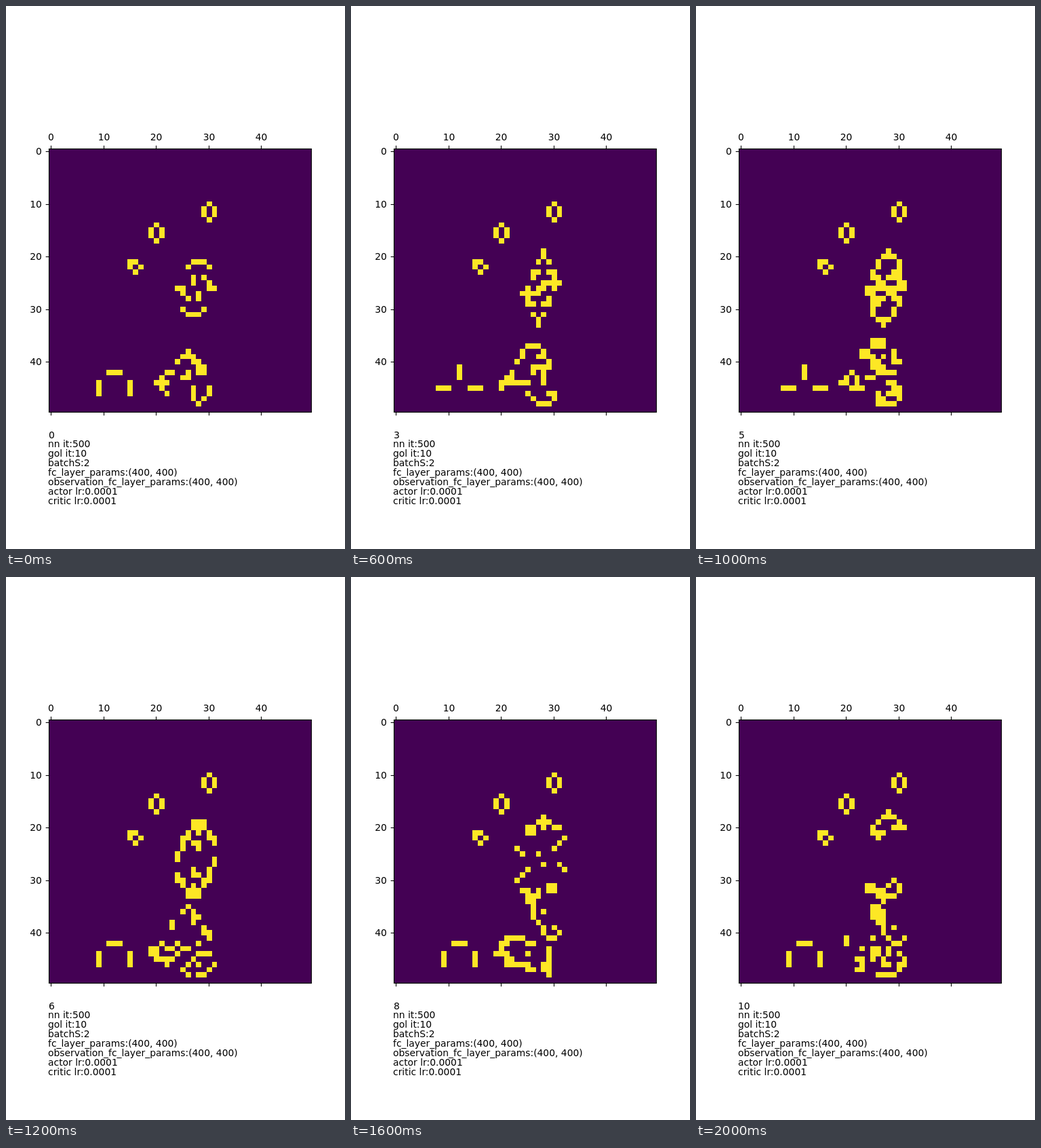
An HTML page with a canvas that plays this animation: 500x800 px, repeating every 8 s.

```html
<!DOCTYPE html>
<html lang="en">
<head>
<meta charset="utf-8">
<title>Game of life</title>
<style>
  html, body { margin: 0; width: 100%; height: 100%; overflow: hidden; background: #fff; }
  canvas, svg { position: absolute; left: 0; top: 0; width: 500px; height: 800px; }
  text { font: 13.889px "DejaVu Sans", sans-serif; fill: #000; white-space: pre; }
</style>
</head>
<body>
<canvas id="board" width="500" height="800"></canvas>
<svg id="labels" viewBox="0 0 500 800"></svg>
<script>
const SIZE = 50, STEP = 200, LAST = 10, LOOP = 8000;
const LEFT = 63, TOP = 210, SIDE = 388, CELL = SIDE / SIZE;
const ctx = document.getElementById('board').getContext('2d');
const svg = document.getElementById('labels');

const emptyGrid = () => Array.from({ length: SIZE }, () => new Uint8Array(SIZE));

function seed() {
  const grid = emptyGrid();
  const put = (y, ...xs) => xs.forEach(x => { grid[y][x] = 1; });
  const column = (x, y, n) => { for (let i = 0; i < n; i++) put(y + i, x); };
  const hive = (x, y) => {
    put(y, x);
    column(x - 1, y + 1, 2);
    column(x + 1, y + 1, 2);
    put(y + 3, x);
  };
  // point-symmetric about (27.5, 26)
  const twin = (y, ...xs) => {
    put(y, ...xs);
    put(52 - y, ...xs.map(x => 55 - x));
  };

  hive(30, 10);
  hive(20, 14);

  put(21, 15, 16);
  put(22, 15, 17);
  put(23, 16);

  twin(21, 27, 28, 29);
  twin(22, 26, 30);
  twin(24, 27, 29);
  twin(25, 27, 30);
  twin(26, 24, 25);

  put(42, 11, 12, 13);
  column(9, 44, 3);
  column(15, 44, 3);

  put(38, 26);
  put(39, 25, 26, 27);
  put(40, 24, 27, 28);
  put(41, 28, 29);
  put(42, 22, 23, 26, 28, 29);
  put(43, 21, 25, 26);
  put(44, 20, 21, 22);
  put(45, 21, 27, 30);
  put(46, 22, 27, 30);
  put(47, 27, 29);
  put(48, 28);
  return grid;
}

// The outermost ring of cells always stays dead.
function evolve(grid) {
  const next = emptyGrid();
  for (let y = 1; y < SIZE - 1; y++) {
    for (let x = 1; x < SIZE - 1; x++) {
      let sum = 0;
      for (let j = y - 1; j <= y + 1; j++) {
        for (let i = x - 1; i <= x + 1; i++) sum += grid[j][i];
      }
      next[y][x] = sum === 3 || (sum === 4 && grid[y][x]) ? 1 : 0;
    }
  }
  return next;
}

const states = [seed()];
while (states.length <= LAST) states.push(evolve(states[states.length - 1]));

function addText(str, x, y, anchor = 'start') {
  const el = document.createElementNS('http://www.w3.org/2000/svg', 'text');
  el.setAttribute('x', x);
  el.setAttribute('y', y);
  el.setAttribute('text-anchor', anchor);
  el.textContent = str;
  svg.appendChild(el);
  return el;
}

const tickX = v => Math.round(62.5 + 7.75 * (v + 0.5));
const tickY = v => Math.round(210.25 + 7.75 * (v + 0.5));
const ticks = [0, 10, 20, 30, 40];

for (const v of ticks) {
  addText(v, tickX(v) + 0.5, 198, 'middle');
  addText(v, 52.8, tickY(v) + 5, 'end');
}
const counter = addText('0', 63, 637);
[
  'nn it:500',
  'gol it:10',
  'batchS:2',
  'fc_layer_params:(400, 400)',
  'observation_fc_layer_params:(400, 400)',
  'actor lr:0.0001',
  'critic lr:0.0001'
].forEach((line, i) => addText(line, 62, 650 + 14 * i));

function line(x1, y1, x2, y2) {
  ctx.beginPath();
  ctx.moveTo(x1, y1);
  ctx.lineTo(x2, y2);
  ctx.stroke();
}

function drawAxes() {
  const l = LEFT + 0.5, t = TOP + 0.5, r = 450.5, b = 598.5;
  ctx.strokeStyle = '#000';
  ctx.lineWidth = 1.11;
  ctx.strokeRect(l, t, r - l, b - t);
  for (const v of ticks) {
    const x = tickX(v) + 0.5, y = tickY(v) + 0.5;
    line(x, t, x, t - 4.86);
    line(x, b, x, b + 4.86);
    line(l, y, l - 4.86, y);
  }
}

function draw(n) {
  const px = x => Math.round(LEFT + CELL * x);
  const py = y => Math.round(TOP + CELL * y);
  ctx.fillStyle = '#fff';
  ctx.fillRect(0, 0, 500, 800);
  ctx.fillStyle = '#440154';
  ctx.fillRect(LEFT, TOP, SIDE, SIDE);
  ctx.fillStyle = '#fde725';
  states[n].forEach((row, y) => row.forEach((on, x) => {
    if (on) ctx.fillRect(px(x), py(y), px(x + 1) - px(x), py(y + 1) - py(y));
  }));
  drawAxes();
  counter.textContent = n;
  counter.setAttribute('x', n < 10 ? 63 : 62);
}

let shown = -1;
const start = performance.now();
function tick() {
  const t = (performance.now() - start) % LOOP;
  const n = Math.min(LAST, Math.floor(t / STEP));
  if (n !== shown) draw(shown = n);
  requestAnimationFrame(tick);
}
tick();
</script>
</body>
</html>
```
